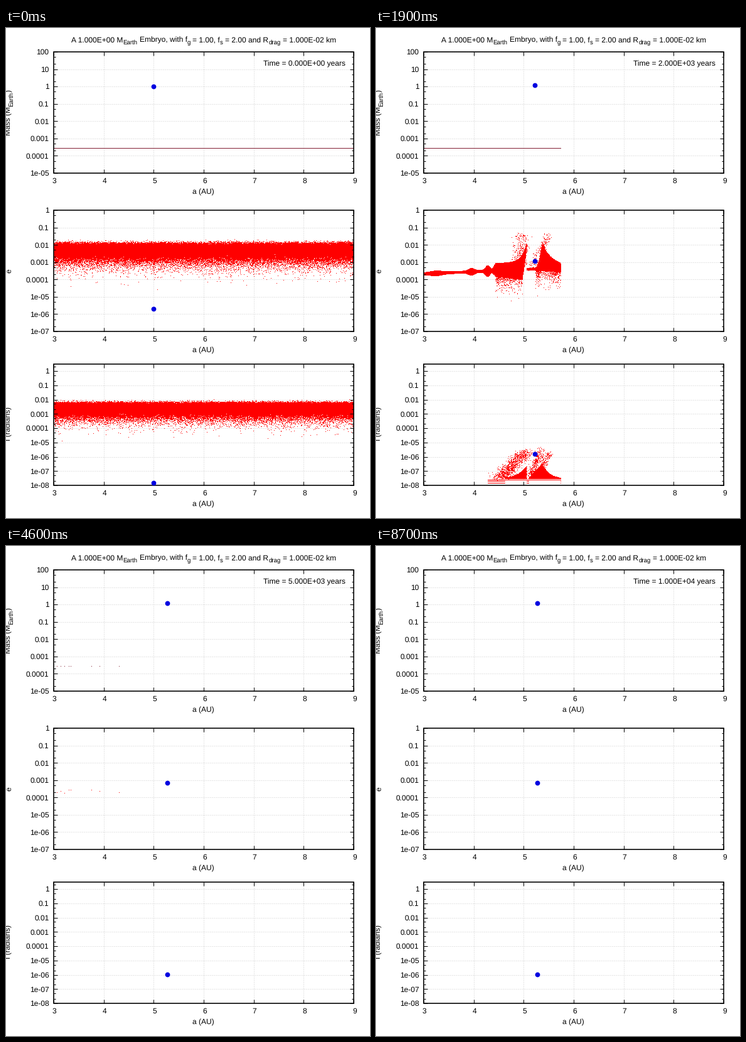
Write a matplotlib script that moves like this. It is 580 by 780 pixels and loops after 8800 ms.

```python
import numpy as np
import matplotlib.pyplot as plt
from matplotlib.animation import FuncAnimation
from matplotlib.collections import LineCollection
from matplotlib.textpath import TextPath

W, H, DPI = 580, 780, 100
FRAMES, INTERVAL = 88, 100
PX = 72 / DPI
LEFT, RIGHT = 76, 554
AU = (RIGHT - LEFT) / 6
RED, MAROON, BLUE = (255, 0, 0, 255), (130, 32, 52, 255), "#0000e0"
HOLDS = {11, 68, *range(47, 78, 6)}
ROUNDOFF = 1.49e-8  # smallest inclination that acos can resolve
INNER, OUTER = 0.968, 1.0275  # scattering spikes, in units of the embryo's a

plt.rcParams.update({"font.family": "Liberation Sans", "text.hinting": "none"})
fig = plt.figure(figsize=(W / DPI, H / DPI), dpi=DPI, facecolor="white")
ax = fig.add_axes([0, 0, 1, 1])


class Panel:
    def __init__(self, top, bottom, decade, low, high):
        self.top, self.bottom, self.decade = top, bottom, decade
        self.low, self.high = low, high

    def y(self, log_value):
        return self.bottom - (log_value - self.low) * self.decade


mass_panel = Panel(38, 231, 193 / 7, -5, 2)
ecc_panel = Panel(290, 483, 193 / 7, -7, 0)
inc_panel = Panel(535, 728, 22.75, -8, 0)


def px_x(a):
    return LEFT + (a - 3) * AU


def label(x, y, text, size=12, ha="left", rotation=0):
    return ax.text(x, y, text, fontsize=size * PX, ha=ha, va="baseline",
                   rotation=rotation, rotation_mode="anchor", zorder=6)


def advance(text, size):
    def right_edge(s):
        return TextPath((0, 0), s, size=size).get_extents().x1
    return right_edge(text + "x") - right_edge("x")


def subscripted(x, y, text, rotation=0):
    """Lay out text in which every second part between bars is a subscript."""
    for i, part in enumerate(text.split("|")):
        size, drop = (9.6, 3) if i % 2 else (12, 0)
        word = part.lstrip()
        step = advance(part, size)
        lead = step - advance(word, size)
        if rotation:
            label(x + drop, y - lead, word, size, rotation=rotation)
            y -= step
        else:
            label(x + lead, y + drop, word, size)
            x += step


def draw_panel(p):
    grid, ticks = [], []
    for a in range(3, 10):
        x = px_x(a)
        grid.append([(x, p.bottom), (x, p.top)])
        ticks += [[(x, p.bottom), (x, p.bottom - 6)], [(x, p.top), (x, p.top + 6)]]
        label(x + 1.3, p.bottom + 16, str(a), ha="center")
    for k in range(p.low, p.high + 1):
        y = p.y(k)
        grid.append([(LEFT, y), (RIGHT, y)])
        label(68.5, y + 4.3, f"{10.0 ** k:g}", ha="right")
        for m, length in ((1, 6), (2, 3), (5, 3)):
            ym = p.y(k + np.log10(m))
            if ym >= p.top:
                ticks += [[(LEFT, ym), (LEFT + length, ym)],
                          [(RIGHT, ym), (RIGHT - length, ym)]]
    ax.add_collection(LineCollection(grid, colors="#cccccc", linewidths=PX,
                                     linestyles=[(0, (1, 2))], zorder=1))
    ax.add_collection(LineCollection(ticks, colors="black", linewidths=PX, zorder=4))
    ax.add_patch(plt.Rectangle((LEFT, p.top), RIGHT - LEFT, p.bottom - p.top,
                               fill=False, lw=1.6 * PX, zorder=5))
    label(314.5, p.bottom + 34, "a (AU)", ha="center")


pixels = np.zeros((H, W, 4), np.uint8)
image = ax.imshow(pixels, extent=(0, W, H, 0), interpolation="nearest",
                  aspect="auto", zorder=2)
ax.set(xlim=(0, W), ylim=(H, 0))
ax.axis("off")
for panel in (mass_panel, ecc_panel, inc_panel):
    draw_panel(panel)
subscripted(104, 23, "A 1.000E+00 M|Earth| Embryo, with f|g| = 1.00, f|s"
                     "| = 2.00 and R|drag| = 1.000E-02 km")
subscripted(8, 171, "Mass (M|Earth|)", rotation=90)
label(8, 389.5, "e", rotation=90)
label(8, 657, "I (radians)", rotation=90)
clock = label(410, 61, "")
embryo, = ax.plot([], [], "o", color=BLUE, ms=7.8 * PX, mew=0, zorder=7)

# Planetesimal swarm, followed by late stragglers that the embryo delays
rng = np.random.default_rng(4)
N, LATE, LAST = 120000, 130, 8
TOTAL = N + LATE + LAST
a0 = np.concatenate([rng.uniform(3, 9, N), 9 + rng.exponential(0.45, LATE),
                     rng.uniform(9.2, 13.4, LAST)])
e0 = rng.rayleigh(0.0043, TOTAL)
i0 = e0 / 2
rng.shuffle(i0)
spread, tail, depth, lift, chance = rng.random((5, TOTAL))
life = np.full(TOTAL, 9.0)
life[N:N + LATE] = 3 + 1.8 * rng.random(LATE)
late = np.arange(TOTAL) >= N


def years(frame):
    shown = frame - (frame in HOLDS)
    t = np.interp(shown, (0, 8, 19, 30, 46, 72, 87), (0, 1, 2, 3, 5, 9, 10))
    return round(t * 40) / 40


def embryo_state(t):
    grown = ((1 - np.cos(np.pi * min(t / 2.8, 1))) / 2) ** 0.85
    mass_y = 93 - 2.5 * grown
    ecc_y = 377 + 70 * np.exp(-t / 0.3) - 6 * np.exp(-((t - 2) / 0.5) ** 2)
    inc_y = 682 + 42 * np.exp(-t / 0.05) - 144 * t * np.exp(-2.14 * t)
    return 5 + 0.27 * grown, (mass_y, ecc_y, inc_y)


def ramp(x, start, end):
    return np.clip((x - start) / (end - start), 0, 1)


def bell(x, center, width):
    return np.exp(-((x - center) / width) ** 2)


def envelope(u):
    """Reach in pixels above and below the forced eccentricity."""
    inner = ramp(u, 0.835, 0.85) * (10 + 30 * np.exp(-np.abs(u - INNER) / 0.018))
    outer = np.where(u < OUTER, 2 + 37 * ramp(u, 1.003, OUTER) ** 1.8,
                     1 + 38 * np.exp(-np.abs(u - OUTER) / 0.042))
    width = 1.7 + (2.3 * bell(u, 0.622, 0.03) + 4 * bell(u, 0.757, 0.015)
                   + 7 * bell(u, 0.819, 0.012))
    below_inner = (ramp(u, 0.835, 0.85) * (7 + 70 * ramp(u, 0.845, 1.845))
                   - 50 * ramp(u, 0.95, INNER) ** 1.2)
    below_outer = 1.2 + 5 * bell(u, 1.1, 0.08)
    near = u < INNER
    return (np.where(near, width + inner, outer),
            np.where(near, width + below_inner, below_outer))


def damping(a, t):
    return np.exp(-t * (10.2 + 0.95 * (7.2 - a)))


def eccentricity(u, a, t, s):
    up, down = envelope(u)
    grow = min(1, t / 0.6)
    offset = (spread[s] * (up + down) - down) * grow
    loose = ((u > 0.85) & (u < 0.953)) | ((u > 1) & (u < 1.18))
    offset += np.where(loose & (tail[s] < 0.07), 7 * np.log(depth[s] + 1e-6), 0)
    forced = 10 ** (-3.66 + 0.125 * (a - 3) + offset / ecc_panel.decade)
    return np.hypot(forced * (1 - np.exp(-t / 0.08)), e0[s] * damping(a, t))


def inclination(u, a, t, s, alive):
    inner = 33 * np.exp(-np.abs(u - INNER) / 0.035) * (u < INNER)
    outer = np.where(u < OUTER, 38 * ramp(u, 0.972, OUTER),
                     38 * np.exp(-np.abs(u - OUTER) / 0.028))
    top = (inner + outer) * np.exp(-0.43 * (t - 1)) * min(1, t / 0.4)
    stirred = 10 ** (-8 + (10 + top * lift[s] ** 1.4) / inc_panel.decade)
    inc = i0[s] * damping(a, t)
    inc = np.where((top > 2) & (tail[s] < alive), np.maximum(inc, stirred), inc)
    floor = (u > 0.82) & (u < 1.1) & (chance[s] < 0.3 * alive * min(1, t))
    inc = np.where(floor, np.maximum(inc, ROUNDOFF * np.sqrt(1 + 2 * depth[s])), inc)
    return ROUNDOFF * np.sqrt(np.floor((inc / ROUNDOFF) ** 2 + 0.4))


def plot_dots(p, a, y, color=RED):
    x, y = np.floor(px_x(a)).astype(int), np.round(y).astype(int)
    ok = (x >= LEFT) & (x < RIGHT) & (y > p.top) & (y < p.bottom)
    pixels[y[ok], x[ok]] = color


def plot_clouds(frame, ap, edge, t, alive):
    """Strongly scattered bodies on both sides of the embryo."""
    r = np.random.default_rng(frame + 100)
    inner = alive * min(1, t / 0.5)
    outer = inner * ramp(edge / ap, 1.01, 1.07)
    tall = 0.8 + 0.2 * t
    low = np.exp(-0.28 * (t - 1))

    def streak(p, count, start, end, blur, base, rise):
        v = r.random(int(count)) ** 1.2
        u = start + (end - start) * v + r.normal(0, blur, v.size)
        plot_dots(p, u * ap, base - rise * v + r.normal(0, 2, v.size))

    streak(ecc_panel, 260 * inner, 0.94, 0.952, 0.014, 376, 40 * tall)
    streak(ecc_panel, 130 * outer, 1.022, 1.05, 0.007, 356, 22 * tall)
    streak(ecc_panel, 90 * outer, 0.985, 1.02, 0.012, 384, 32)
    streak(inc_panel, 1000 * inner, 0.87, 0.963, 0.017, 716, 57 * low)
    streak(inc_panel, 350 * outer, 0.985, 1.027, 0.009, 710, 51 * low)
    streak(inc_panel, 120 * outer, 1.03, 1.06, 0.006, 696, 26 * low)


def update(frame):
    t = years(frame)
    ap, ys = embryo_state(t)
    shrink = np.exp(-0.225 * t)
    edge = 9 * shrink
    a = a0 * shrink
    s = np.flatnonzero((a >= 3) & (life > t) & (~late | (a < ap * 1.03)))
    a = a[s]
    u = a / ap
    alive = ramp(edge / ap, 0.93, 1)

    pixels[:] = 0
    plot_dots(mass_panel, a, np.full(a.size, 191), MAROON)
    seen = ((u < INNER) | (u > 1.003) | late[s]
            | (chance[s] < max(0.08, 1 - t / 0.3)))
    ecc = eccentricity(u, a, t, s)
    plot_dots(ecc_panel, a[seen], ecc_panel.y(np.log10(ecc[seen])))
    inc = inclination(u, a, t, s, alive)
    tilted = inc > 0
    plot_dots(inc_panel, a[tilted], inc_panel.y(np.log10(inc[tilted])))
    plot_clouds(frame, ap, edge, t, alive)

    image.set_data(pixels)
    embryo.set_data([px_x(ap)] * 3, ys)
    clock.set_text(f"Time = {t * 1000:.3E} years")
    return image, embryo, clock


anim = FuncAnimation(fig, update, frames=FRAMES, interval=INTERVAL,
                     init_func=lambda: update(0), repeat=True, repeat_delay=0)
plt.show()
```
